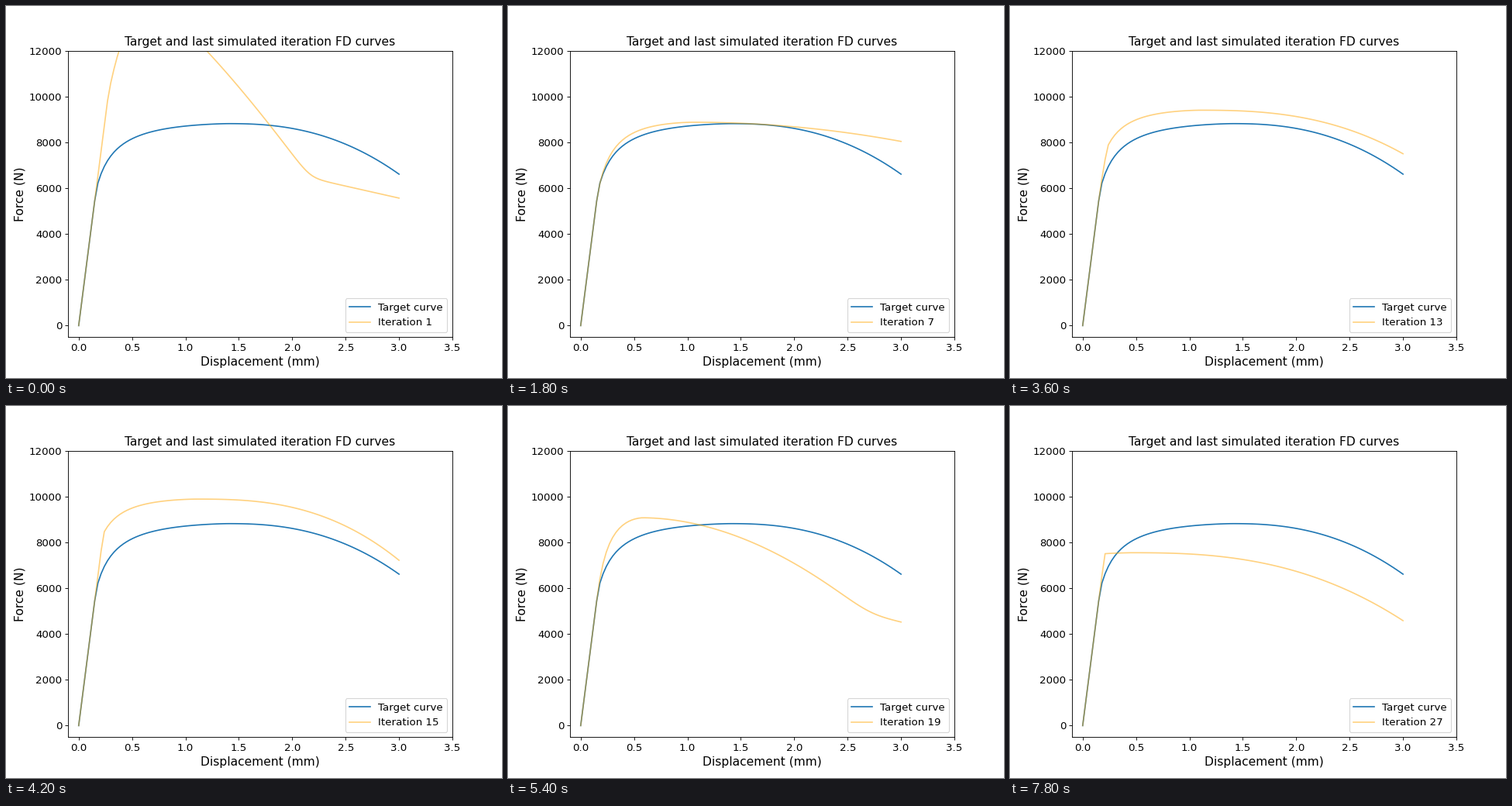
Recreate the animation shown at these times as a matplotlib script. Size 640 by 480 pixels, loop 8000 ms.

```python
import matplotlib.pyplot as plt
import numpy as np
from matplotlib.animation import FuncAnimation

INTERVAL = 100          # ms per animation frame
HOLD = 3                # animation frames per iteration
FRAMES = 80

STIFFNESS = 36300       # N/mm, shared elastic branch
YIELD = 0.16            # mm
TAIL_SLOPE = 1050       # N/mm, softening once only residual force is left
TAIL_BLEND = 250        # N, roundness of the bend into the tail

plt.rcParams.update({
    "font.family": "DejaVu Sans",
    "font.size": 12,
    "axes.titlesize": 14,
    "axes.labelsize": 14,
})

displacement = np.linspace(0, 3, 101)


def force_curve(peak_at, peak, rise, rise_power, fall, fall_power, residual=0):
    """Elastic line, hardening up to a peak, then power-law softening."""
    x = np.maximum(displacement, YIELD)
    hardening = rise * np.maximum(x**-0.5 - peak_at**-0.5, 0) ** rise_power
    softening = fall * np.maximum(x - peak_at, 0) ** fall_power
    tail = residual + TAIL_SLOPE * (displacement[-1] - x)
    softened = TAIL_BLEND * np.logaddexp((peak - softening) / TAIL_BLEND,
                                         tail / TAIL_BLEND)
    return np.minimum(STIFFNESS * displacement, softened - hardening)


target = force_curve(1.4, 8815, 1455, 1.4, 714, 2.4)

key_curves = {
    1: force_curve(0.6, 14380, 7100, 1.0, 4533, 1.25, residual=5565),
    7: force_curve(1.05, 8875, 1621, 1.55, 220, 2.0),
    10: force_curve(1.1, 8675, 1461, 1.5, 188, 2.15),
    15: force_curve(1.1, 9885, 1253, 1.5, 478, 2.68),
    19: force_curve(0.58, 9070, 2488, 1.6, 1023, 1.9, residual=4515),
    23: force_curve(1.75, 8335, 1080, 1.0, 656, 2.4),
    27: force_curve(0.45, 7545, 60, 1.0, 260, 2.6),
}


def simulated(iteration):
    """Blend the two key curves on either side of an iteration."""
    before = max(k for k in key_curves if k <= iteration)
    after = min(k for k in key_curves if k >= iteration)
    blend = (iteration - before) / max(after - before, 1)
    return (1 - blend) * key_curves[before] + blend * key_curves[after]


fig, ax = plt.subplots(figsize=(8, 6), dpi=80)
ax.plot(displacement, target, color="tab:blue", label="Target curve")
sim_line, = ax.plot(displacement, simulated(1), color="orange", alpha=0.5,
                    label="Iteration 1")
ax.set(xlim=(-0.1, 3.5), ylim=(-500, 12000),
       xlabel="Displacement (mm)", ylabel="Force (N)",
       title="Target and last simulated iteration FD curves")
legend_label = ax.legend(loc="lower right").get_texts()[1]


def update(frame):
    iteration = frame // HOLD + 1
    sim_line.set_ydata(simulated(iteration))
    legend_label.set_text(f"Iteration {iteration}")
    return sim_line, legend_label


animation = FuncAnimation(fig, update, frames=FRAMES, interval=INTERVAL,
                          repeat=True, repeat_delay=0)
plt.show()
```
